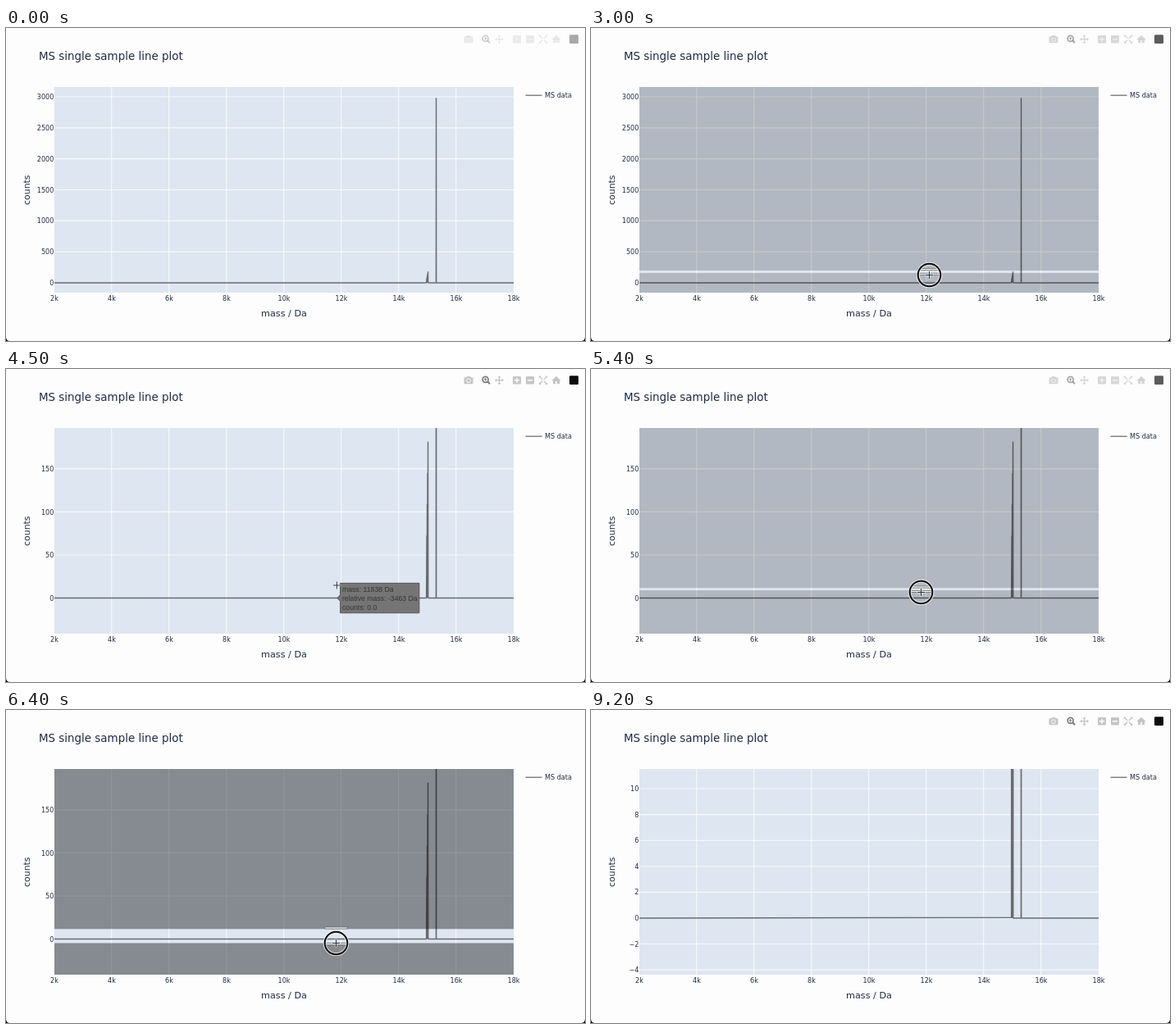
Write an HTML page with a canvas that moves like this. It is 706 px wide and 382 px high and loops after 9300 ms.

```html
<!DOCTYPE html>
<html lang="en">
<head>
<meta charset="utf-8">
<title>MS single sample line plot</title>
<style>
html, body { margin: 0; width: 100%; height: 100%; overflow: hidden; background: #fdfdfd; }
canvas { display: block; width: 706px; height: 382px; }
</style>
</head>
<body>
<canvas id="stage"></canvas>
<script>
const W = 706, H = 382, LOOP = 9300;
const canvas = document.getElementById('stage');
const ctx = canvas.getContext('2d');
const ratio = window.devicePixelRatio || 1;
canvas.width = W * ratio;
canvas.height = H * ratio;

const PLOT = { l: 59, t: 72, r: 619, b: 323 };
const INK = '#1f2a44', TRACE = '#6a6a6d', PAPER = '#fdfdfd';
const SANS = '"DejaVu Sans", Verdana, sans-serif';
const HOVER_FONT = '8.7px "Liberation Sans", Arial, sans-serif';
const MAIN_PEAK = 15301;

// Vertical ranges before and after each zoom
const VIEWS = [
  { from: 0, lo: -158.6, hi: 3158.6, step: 500 },
  { from: 3900, lo: -41.3, hi: 197.4, step: 50 },
  { from: 6700, lo: -4.37, hi: 11.52, step: 2 }
];
const DRAGS = [
  { down: 2900, up: 3900, x: 412.5, y: 296 },
  { down: 5300, up: 6700, x: 402.5, y: 267.3 }
];
// Pointer moves, each easing out from wherever the last one ended
const ENTRY = { x: 700, y: 232 };
const MOVES = [
  { from: 100, to: 1000, x: 436, y: 296.5 },
  { from: 1200, to: 1600, x: 427.5, y: 292.5 },
  { from: 1600, to: 2400, x: 412.5, y: 296 },
  { from: 2900, to: 3500, x: 412.5, y: 314 },
  { from: 3900, to: 4500, x: 403.35, y: 264 },
  { from: 4800, to: 5000, x: 402.5, y: 267.3 },
  { from: 5300, to: 5850, x: 402.5, y: 281 + 2 },
  { from: 6200, to: 6400, x: 402.5, y: 284.5 },
  { from: 8800, to: 9200, x: 400, y: 345 }
];

// A short staircase of side peaks, then the main one
function spectrum() {
  const pts = [[2000, 0], [14960, 0.05]];
  for (let i = 0; i < 4; i++) {
    const m = 14973 + 14 * i;
    pts.push([m, 36.3 * (i + 2)], [m + 7, 0]);
  }
  return pts.concat([[MAIN_PEAK - 4, 0], [MAIN_PEAK, 2985], [MAIN_PEAK + 4, 0], [18000, 0]]);
}
const DATA = spectrum();

const clamp = v => Math.max(0, Math.min(1, v));
const easeOut = k => 1 - (1 - k) ** 2;
const massX = m => PLOT.l + (m - 2000) * 0.035;
const xMass = x => Math.floor(2000 + (x - PLOT.l) / 0.035);
const countY = (v, c) => PLOT.t + (v.hi - c) / (v.hi - v.lo) * (PLOT.b - PLOT.t);

function cursorAt(t) {
  let { x, y } = ENTRY;
  for (const m of MOVES) {
    const k = easeOut(clamp((t - m.from) / (m.to - m.from)));
    x += (m.x - x) * k;
    y += (m.y - y) * k;
  }
  return { x, y };
}

function label(s, x, y, size, align = 'left') {
  ctx.font = size + 'px ' + SANS;
  ctx.fillStyle = INK;
  ctx.textAlign = align;
  ctx.fillText(s, x, y + size * 0.36);
}

function trail(pts) {
  ctx.beginPath();
  pts.forEach(([x, y]) => ctx.lineTo(x, y));
}

function line(color, width, ...pts) {
  trail(pts);
  ctx.strokeStyle = color;
  ctx.lineWidth = width;
  ctx.stroke();
}

function shape(color, ...pts) {
  trail(pts);
  ctx.fillStyle = color;
  ctx.fill();
}

function ring(color, width, x, y, r) {
  ctx.beginPath();
  ctx.arc(x, y, r, 0, 7);
  ctx.strokeStyle = color;
  ctx.lineWidth = width;
  ctx.stroke();
}

function block(color, x, y, w, h, r = 0) {
  ctx.beginPath();
  ctx.roundRect(x, y, w, h, r);
  ctx.fillStyle = color;
  ctx.fill();
}

function plus(color, width, x, y, arm) {
  line(color, width, [x - arm, y], [x + arm, y]);
  line(color, width, [x, y - arm], [x, y + arm]);
}

function drawPlot(view) {
  const { l, t, r, b } = PLOT;
  block('#dee6f1', l, t, r - l, b - t);
  ctx.save();
  ctx.beginPath();
  ctx.rect(l, t, r - l, b - t);
  ctx.clip();
  for (let m = 4000; m < 18000; m += 2000) {
    const x = massX(m) - 0.3;
    line('#f8fafd', 1.1, [x, t], [x, b]);
  }
  const ticks = [];
  for (let c = Math.ceil(view.lo / view.step) * view.step; c <= view.hi; c += view.step) ticks.push(c);
  for (const c of ticks) {
    const y = countY(view, c);
    line('#f8fafd', 1.1, [l, y], [r, y]);
  }
  ctx.lineJoin = 'bevel';
  line(TRACE, 1.4, ...DATA.map(([m, c]) => [massX(m), countY(view, c)]));
  ctx.lineJoin = 'miter';
  ctx.restore();
  for (const c of ticks) {
    label(String(c).replace('-', '\u2212'), 58.3, countY(view, c) + 0.2, 8.05, 'right');
  }
}

function drawText() {
  label('MS single sample line plot', 40, 34, 13.43);
  for (let k = 2; k <= 18; k += 2) label(k + 'k', massX(k * 1000), 330, 8.05, 'center');
  label('mass / Da', 339, 347.8, 11.2, 'center');
  ctx.save();
  ctx.translate(24.8, 197.7);
  ctx.rotate(-Math.PI / 2);
  label('counts', 0, 0, 10.9, 'center');
  ctx.restore();
  line('#7a7a7d', 1.4, [633.5, 82.2], [653.5, 82.2]);
  label('MS data', 657, 82.5, 8.1);
}

function drawModebar(alpha) {
  if (alpha <= 0) return;
  const soft = '#c5c5c6', dark = '#7c7c7e', y = 13.7;
  ctx.save();
  ctx.globalAlpha = alpha;

  // camera
  block(soft, 558.5, 10.2, 11, 8, 1.2);
  block(soft, 561.5, 9, 5, 3, 1);
  ring(PAPER, 1, 564, 14.2, 2.4);

  // magnifier
  ring(dark, 1.7, 584.6, 12.8, 3.5);
  line(dark, 2, [587.2, 15.3], [590, 18.2]);
  plus(dark, 1, 584.6, 12.8, 1.8);

  // move arrows
  for (let i = 0; i < 4; i++) {
    ctx.save();
    ctx.translate(601.5, y);
    ctx.rotate(i * Math.PI / 2);
    line(soft, 1.4, [0, 0], [3.6, 0]);
    shape(soft, [3.2, -2.1], [5.5, 0], [3.2, 2.1]);
    ctx.restore();
  }

  // zoom in and out
  for (const x of [623, 639]) block(soft, x - 5, y - 4.8, 10, 9.6, 1);
  plus(PAPER, 1.5, 623, y, 3);
  line(PAPER, 1.5, [636, y], [642, y]);

  // fit to data
  for (let i = 0; i < 4; i++) {
    ctx.save();
    ctx.translate(655, y);
    ctx.rotate(i * Math.PI / 2);
    line(soft, 1.3, [0.8, 0.8], [4, 4]);
    shape(soft, [5.2, 5.2], [2.4, 5.2], [5.2, 2.4]);
    ctx.restore();
  }

  // house
  shape(soft, [671, 8.8], [676.6, 14], [665.4, 14]);
  block(soft, 667, 13.2, 8, 5);
  block(PAPER, 670, 15, 2, 3.2);

  block('#0c0c0c', 687, 8.2, 11, 10.8, 1.2);
  ctx.restore();
}

function drawZoomBox(drag, t) {
  const { l, t: top, r, b } = PLOT;
  const shade = 0.4 * clamp((t - drag.down) / 200);
  if (shade <= 0) return;
  const end = cursorAt(Math.max(drag.down, t - 50)).y;
  const dim = `rgba(0,0,0,${shade})`;
  block(dim, l, top, r - l, drag.y - top);
  block(dim, l, end, r - l, b - end);
  for (const y of [drag.y - 2.3, end + 0.3]) {
    block('#fff', drag.x - 13.7, y, 27.4, 2);
    ctx.strokeStyle = '#555';
    ctx.lineWidth = 0.7;
    ctx.strokeRect(drag.x - 13.7, y, 27.4, 2);
  }
}

function drawHover(x, view) {
  const mass = xMass(x), y = countY(view, 0);
  const rows = [`mass: ${mass} Da`, `relative mass: ${mass - MAIN_PEAK} Da`, 'counts: 0.0'];
  ctx.font = HOVER_FONT;
  const w = Math.max(...rows.map(s => ctx.measureText(s).width)) + 4.6;
  const l = x + 4.2, h = 18.2, tip = [x + 0.5, y];
  const outline = [tip, [l, y - 4], [l, y - h], [l + w, y - h], [l + w, y + h], [l, y + h], [l, y + 4], tip];
  shape('#757576', ...outline);
  line('#4b4548', 0.8, ...outline);
  ctx.fillStyle = '#353536';
  ctx.textAlign = 'left';
  rows.forEach((s, i) => ctx.fillText(s, l + 2.4, y - 7.9 + i * 11.3));
}

function drawCursor({ x, y }, pressed) {
  if (pressed) {
    ring('rgba(255,255,255,.75)', 4, x, y, 13.8);
    ring('#080808', 2, x, y, 13.8);
  }
  if (x < PLOT.r && y < PLOT.b) {
    plus('rgba(255,255,255,.7)', 2.2, x, y, 5);
    plus('#2c2d30', 1, x, y, 4.5);
    return;
  }
  const arrow = [[0, 0], [0, 11], [3, 8.4], [8, 8], [0, 0]].map(([a, b]) => [x + a, y + b]);
  shape('#111', ...arrow);
  line('#fff', 0.9, ...arrow);
}

// The toolbar hides while a drag is on
function barAlpha(t) {
  let alpha = clamp(0.35 + t / 300);
  for (const d of DRAGS) {
    if (t >= d.up) alpha = clamp((t - d.up + 100) / 300);
    else if (t >= d.down) alpha = 1 - clamp((t - d.down) / 300);
  }
  return alpha;
}

function drawCorners() {
  for (const [x, s] of [[0, 1], [W, -1]]) {
    ctx.beginPath();
    ctx.moveTo(x, H);
    ctx.lineTo(x, H - 5);
    ctx.quadraticCurveTo(x, H, x + 5 * s, H);
    ctx.fillStyle = '#000';
    ctx.fill();
  }
}

function draw(t) {
  ctx.setTransform(ratio, 0, 0, ratio, 0, 0);
  block(PAPER, 0, 0, W, H);
  const view = VIEWS.filter(v => t >= v.from).pop();
  const drag = DRAGS.find(d => t >= d.down && t < d.up);
  const cursor = cursorAt(t);
  drawPlot(view);
  drawText();
  drawModebar(barAlpha(t));
  if (drag) drawZoomBox(drag, t);
  if (t >= 4300 && t < 5300) drawHover(cursor.x, view);
  if (t >= 100 && t < 9200) drawCursor(cursor, !!drag);
  drawCorners();
}

const start = performance.now();
function tick() {
  const t = (performance.now() - start) % LOOP;
  draw(Math.floor(t / 100) * 100);
  requestAnimationFrame(tick);
}
tick();
</script>
</body>
</html>
```
